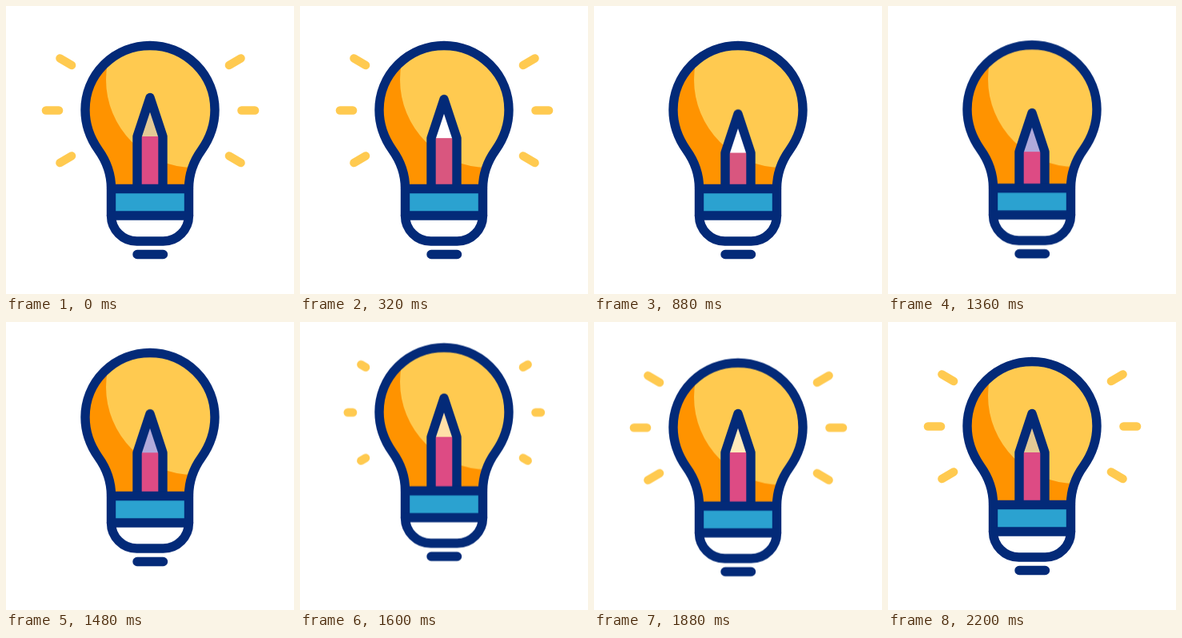
Recreate the animation shown at these times as an HTML page without scripts. Size 360 by 360 pixels, loop 2.28 s.

```html
<!DOCTYPE html>
<html lang="en">
<head>
<meta charset="utf-8">
<title>Idea bulb</title>
<style>
  html, body { margin: 0; width: 100%; height: 100%; overflow: hidden; background: #fff; }
  svg { display: block; width: 100vw; height: 100vh; }

  .line { fill: none; stroke: #032a78; stroke-width: 11.4; stroke-linecap: round; stroke-linejoin: round; }
  .rays { fill: none; stroke: #ffca50; stroke-width: 10.6; stroke-linecap: round; stroke-dasharray: 1 3; }

  .bulb, .pencil, .rays, .tip, .body { animation: 2280ms infinite; }
  .bulb { animation-name: hop; }
  .pencil { animation-name: slide; }
  .rays { animation-name: trim, show; animation-timing-function: ease-in-out, step-end; }
  .tip { animation-name: tip; animation-timing-function: step-end; }
  .body { animation-name: body; animation-timing-function: step-end; }

  @keyframes hop {
    0%, 57.895% { transform: none; animation-timing-function: ease-in-out; }
    70.175% { transform: translateY(-17.5px); animation-timing-function: ease-in-out; }
    82.456% { transform: translateY(1.6px); animation-timing-function: ease-in-out; }
    96.491%, 100% { transform: none; }
  }
  @keyframes slide {
    0%, 7.018% { transform: none; animation-timing-function: ease-in-out; }
    38.596%, 57.895% { transform: translateY(20.5px); animation-timing-function: ease-in-out; }
    75.439% { transform: translateY(-7px); animation-timing-function: ease-in-out; }
    85.965%, 100% { transform: none; }
  }
  /* rays leave from the inner end and grow back outwards */
  @keyframes trim {
    0%, 20.175% { stroke-dashoffset: 0; }
    31.579% { stroke-dashoffset: -1; animation-timing-function: step-end; }
    64.912% { stroke-dashoffset: 1; }
    77.193%, 100% { stroke-dashoffset: 0; }
  }
  @keyframes show {
    0% { visibility: visible; }
    31.5% { visibility: hidden; }
    65% { visibility: visible; }
    100% { visibility: visible; }
  }
  @keyframes tip {
    0% { fill: #e4ca95; }
    8.772% { fill: #fff; }
    59.649% { fill: #b1aadb; }
    70.175% { fill: #ffe0a8; }
    81% { fill: #ffebbb; }
    84.2% { fill: #e4ca95; }
    100% { fill: #e4ca95; }
  }
  @keyframes body {
    0% { fill: #dd4b84; }
    8.772% { fill: #d9567f; }
    59.649% { fill: #dd4b84; }
    100% { fill: #dd4b84; }
  }
</style>
</head>
<body>
<svg viewBox="0 0 360 360">
  <defs>
    <path id="glass" d="M131.5 228C131.500 212 127 196 115.500 180C105 165 99 149 99 130A81 80.500 0 0 1 261 130C261 149 255 165 244.500 180C233 196 228.500 212 228.500 228"/>
    <path id="base" d="M131.500 228.500V262A32 32 0 0 0 163.500 294H196.500A32 32 0 0 0 228.500 262V228.500Z"/>
    <clipPath id="inside"><use href="#glass"/></clipPath>
  </defs>
  <g class="bulb">
    <g class="rays">
      <path pathLength="1" d="M66 130.500H50"/>
      <path pathLength="1" d="M294.500 130.500H311"/>
      <path pathLength="1" d="M82 74L67.500 65.500"/>
      <path pathLength="1" d="M279 74L293.500 65.500"/>
      <path pathLength="1" d="M82 187.500L67.500 196"/>
      <path pathLength="1" d="M279 187.500L293.500 196"/>
    </g>

    <g clip-path="url(#inside)">
      <path fill="#ff9300" d="M90 40H270V230H90Z"/>
      <circle cx="235" cy="92" r="110" fill="#ffca50"/>
    </g>

    <g class="pencil">
      <path class="tip" d="M164 163L180 114L196 163Z"/>
      <path class="body" d="M164 163H196V240H164Z"/>
      <path class="line" d="M164 240V163L180 114.500L196 163V240"/>
    </g>

    <use href="#base" fill="#fff"/>
    <path fill="#2ba2d0" d="M131.500 228H228.500V262H131.500Z"/>
    <g class="line">
      <use href="#glass"/>
      <use href="#base"/>
      <path d="M131.500 262H228.500M164 310.500H196.500"/>
    </g>
  </g>
</svg>
</body>
</html>
```
